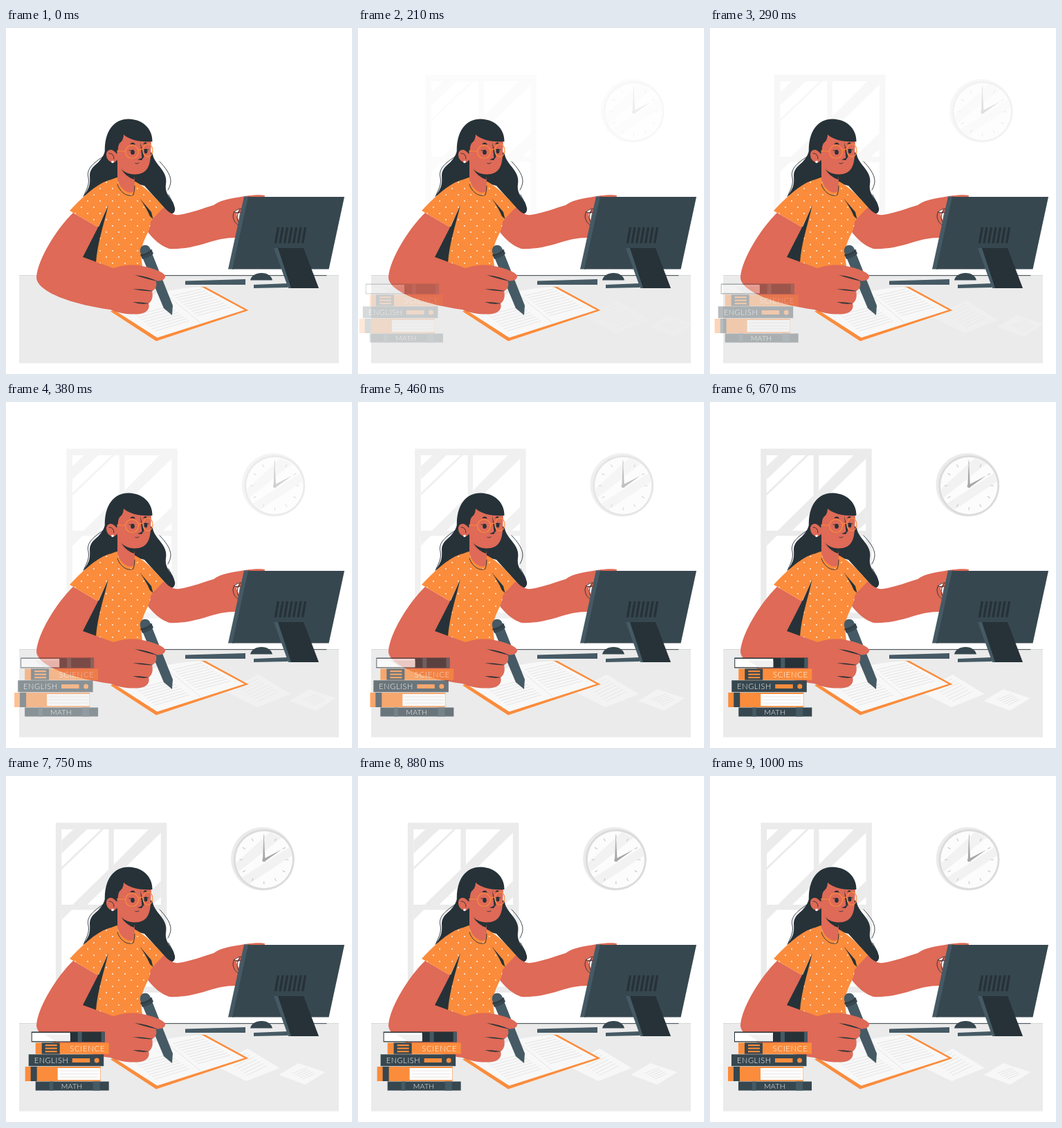
An HTML page for the animation above (1040 ms loop, 500 by 500 pixels).

```html
<!DOCTYPE html>
<html lang="en">
<head>
<meta charset="utf-8">
<title>Studying at the desk</title>
<style>
  html, body { margin: 0; width: 100%; height: 100%; overflow: hidden; background: #fff; }
  svg { display: block; width: 100vw; height: 100vh; }
  text { font: 300 11.5px Lato, "Open Sans", sans-serif; letter-spacing: .6px; fill: #fff; }
  .skin { fill: #de6a57; }
  .dark { fill: #263238; }
  .slate { fill: #37474f; }
  .steel { fill: #455a64; }
  .orange { fill: #fb8c3c; }
  .pale { fill: #ebebeb; }
  .white { fill: #fff; }
  .ink { fill: none; stroke: #263238; stroke-width: .9; stroke-linecap: round; }
  .rule { fill: none; stroke: #e0e0e0; stroke-width: .8; }
  .wire { fill: none; stroke: #fb8c3c; stroke-width: 1.2; }
</style>
</head>
<body>
<svg viewBox="0 0 500 500">
  <defs>
    <pattern id="dots" width="18" height="18" x="132" y="228" patternUnits="userSpaceOnUse">
      <rect width="18" height="18" class="orange"/>
      <circle cx="4" cy="4" r=".9" class="white"/>
      <circle cx="13" cy="13" r=".9" class="white"/>
    </pattern>
  </defs>

  <g data-from="30">
    <path class="pale" d="M73.5 67.5H234V313H73.5Z"/>
    <path class="white" d="M82 77H150V186H82ZM157.500 77H225.500V186H157.500ZM82 193.500H150V304.500H82ZM157.500 193.500H225.500V304.500H157.500Z"/>
    <path class="pale" d="M82 93L99 77H119L82 112ZM82 131.500L139 77H143L82 135.500ZM98 186L150 135V156L119 186ZM157.500 128L208 77H225.500V82L157.500 148ZM82 193H97L82 208ZM190 186L225.500 152V175L213 186Z"/>
  </g>

  <g data-from="30">
    <circle cx="372.500" cy="119.700" r="45.700" class="pale"/>
    <circle cx="374.500" cy="121" r="44" fill="#dbdbdb"/>
    <circle cx="374.500" cy="121" r="41.200" fill="#fcfcfc"/>
    <path fill="#f2f2f2" d="M334 126L383 81L400 89L337 139ZM342 147L411 103L415 115L353 156Z"/>
    <g id="ticks" stroke="#c4c4c4"></g>
    <path fill="#a8a8a8" d="M372.700 122L374.200 82L376.200 122ZM373.500 120L399.500 106.500L375.500 123.500Z"/>
    <circle cx="374.500" cy="121.500" r="2.500" fill="#a8a8a8"/>
  </g>

  <path class="pale" d="M19 357.500H481V484.500H19Z"/>
  <path d="M19 357.500H481" stroke="#c4c6c7" stroke-width=".6"/>
  <path class="ink" d="M225 357.700H463"/>

  <g data-from="30">
    <path fill="#f7f7f7" d="M303 418L351 394L397 422L349 441ZM396 432L424 415L463 428L434 446Z"/>
    <g id="notes" class="rule"></g>
  </g>

  <!-- notebook -->
  <path class="orange" d="M151 409.500L160 406L284 374L288 374L350.500 408L217 452.500Z"/>
  <path fill="#f8f8f8" d="M157 408L200 390Q232 376 283.500 374.500L344.500 407.500L218.500 447.500Z"/>
  <g id="lines" class="rule"></g>
  <path class="rule" d="M235 388Q256 405 281 426"/>

  <!-- keyboard and mouse -->
  <path class="steel" d="M259 365.500L346 363V371H259ZM358 371L407 369V375L358 376Z"/>
  <path class="slate" d="M353 364.500C354 358 362 354 369 354C378 354 384 359 385 364.500Z"/>

  <!-- hair behind -->
  <path class="dark" d="M145 165C143 199 122 194 121 213C122 228 120 232 111 244L150 222L163 218L200 228L237 269C242 269 245 265 244 260C241 246 229 242 231 226C235 206 214 198 212 182L200 170Z"/>
  <path class="ink" d="M140 186C125 196 116 204 119 216C121 227 116 234 113 241M222 193C240 212 241 222 234 234M235 241C239 250 245 255 242 266"/>

  <!-- far arm -->
  <path class="skin" d="M228 259C235 267 243 271 250 270C270 267 285 260 300 256C312 247 330 246 345 243C358 241 370 241 374 242L370 270L334 303C315 303 306 306 292 310C270 317 252 320 236 319C222 314 214 306 205 295L207 272Z"/>
  <path class="white" d="M330 266Q332 262 337 262L334 267ZM333 269L338 267L336 278Z"/>
  <path class="ink" d="M341 261Q328 262 328 272Q329 282 337 285.500M338 263Q330 273 338 284M329 266Q335 268 341 266"/>

  <!-- body -->
  <path fill="url(#dots)" d="M152 219L160 216L187 222C202 230 216 245 228 259L212 276L209 280C209 294 199 302 196 320C194 332 197 338 197 346L155 348L129 338C132 310 139 286 148 257L133 288L92 264C113 242 132 224 152 219Z"/>
  <path class="dark" d="M148 256L134 287L125 290L105 331L130 339C132 312 140 288 148 256ZM193 246L210 266L212.500 276L208 272Q203 260 193 246Z"/>
  <path class="skin" d="M161 185V218C164 232 177 242 185 236L186 222L184 206Z"/>
  <path class="dark" d="M166 203Q174 211 185 211V219Q173 215 166 203Z"/>
  <path class="ink" d="M161 226C165 238 176 245 184 241Q186 236 186 228"/>

  <!-- head -->
  <path class="skin" d="M159 165L172 148L210 160L209 184C208 202 202 211 187 211.500C173 211.500 163 205 160 189Z"/>
  <path class="dark" d="M143 182C141 148 157 131.500 177 131.500C200 132 212 148 211.500 164C196 165 180 163 170 154C169 168 163 162 162 174L160 182C152 172 146 176 145 186Z"/>
  <path class="skin" d="M160 182C153 172 145 176 145 183C145 190 150 195 157 194L161 190Z"/>
  <path class="ink" d="M149 181Q156 181 156 189"/>
  <circle cx="154" cy="193.500" r="1.800" class="white"/>
  <path class="dark" d="M179 168Q184 163 187 168.500L183 168ZM198 168Q202 162 204 168L201 167.500Z"/>
  <ellipse class="dark" cx="183" cy="179.500" rx="2.800" ry="3.600"/>
  <ellipse class="dark" cx="202" cy="178" rx="2.400" ry="3.400"/>
  <path class="ink" d="M178 177L183 177M199 175.500L206 176M187 195.500Q190 197 192 195"/>
  <path class="dark" d="M194 165Q197 177 199.500 186L196 191L190 190.500L196.500 187.500Z"/>
  <g class="wire">
    <circle cx="182" cy="179" r="9.500"/>
    <ellipse cx="205" cy="177" rx="7" ry="9.300"/>
    <path d="M160 178L172.500 178M191.500 177Q195 174 198 176"/>
  </g>

  <!-- monitor -->
  <path class="steel" d="M344 243.500H352L329 348.500H321Z"/>
  <path class="slate" d="M350 244H489L466.500 348.500H327Z"/>
  <path id="vents" class="ink" style="stroke-width:3.500;stroke-linecap:butt"/>
  <path class="steel" d="M387 318H395L416 376H408Z"/>
  <path class="dark" d="M393 318H430L452 376H412Z"/>

  <!-- pen and writing arm -->
  <path class="steel" d="M194 324C192 312 205 311 208 318L241 401L240 415L228 405Z"/>
  <path class="slate" d="M194 327Q204 326 210 319.500L213 326Q207 332 197 334Z"/>
  <path class="ink" d="M195 329Q206 327 211 321"/>
  <path class="skin" d="M97 267C73 290 46 334 44 360C44 381 94 399 151 407C166 414 188 415 198 412C205 410 208 404 206 398C211 395 213 388 211 380C217 378 219 370 216 365C224 367 231 363 230 358C228 352 205 344 186 342.500C170 342 163 345 155 347L111 331L133 288Z"/>
  <path class="dark" d="M186 357Q205 359 219 366Q204 363 186 357ZM183 377Q198 377 213 380Q198 381 183 377ZM183 396Q195 396 207 398Q194 400 183 396Z"/>

  <!-- books -->
  <g data-from="-30">
    <path class="dark" d="M35 369.500H141V384.500H35Z"/>
    <path class="white" d="M36 371H91V383.300H36Z"/>
    <path fill="#f0f0f0" d="M55 374H91V383.300H70Z"/>
    <path class="steel" d="M102 370H108V384H102ZM136 370H141V384H136Z"/>

    <path class="orange" d="M41 385.500H147V401.700H41Z"/>
    <path class="slate" d="M50 385.500H76V401.700H50Z"/>
    <path class="orange" d="M55 388H72V390.300H55ZM55 392.500H72V394.800H55ZM55 397H72V399.300H55Z"/>
    <text x="90.500" y="398">SCIENCE</text>

    <path class="slate" d="M31 402.300H139.500V419.300H31Z"/>
    <path class="orange" d="M94 408H119.500V414H94Z"/>
    <circle cx="129.500" cy="411" r="3.500" class="orange"/>
    <text x="39" y="415" style="font-size:11px">ENGLISH</text>

    <path class="orange" d="M26 420H135V441H26Z"/>
    <path class="slate" d="M34 420H43V441H34Z"/>
    <path class="white" d="M73 422H134.500V439.300H73Z"/>
    <path class="rule" d="M76 426H132M76 430.500H132M76 435H132"/>

    <path class="slate" d="M41 441.500H147V454.500H41Z"/>
    <path class="steel" d="M61 441.500H66.500V454.500H61ZM124 441.500H134V454.500H124Z"/>
    <text x="78" y="451.700" style="font-size:10.500px;letter-spacing:.3px">MATH</text>
  </g>
</svg>
<script>
const byId = id => document.getElementById(id);
const path = d => `<path d="${d}"/>`;

// Parallel strokes: the ends of the first one, then the step of each end.
function ruled(count, [x1, y1, x2, y2], [dx1, dy1, dx2, dy2]) {
  let d = '';
  for (let i = 0; i < count; i++)
    d += `M${x1 + i * dx1} ${y1 + i * dy1}L${x2 + i * dx2} ${y2 + i * dy2}`;
  return d;
}

byId('vents').setAttribute('d', ruled(7, [393.5, 288, 389.5, 311], [6.5, 0, 6.5, 0]));
byId('lines').innerHTML =
  path(ruled(10, [241, 387, 283, 377], [3.9, 3.2, 4.6, 2.9])) +
  path(ruled(8, [187, 415, 237, 402], [4, 3.3, 4, 3]));
byId('notes').innerHTML =
  path(ruled(7, [323, 413, 350, 400], [4.5, 3.3, 4.8, 3.1])) +
  path(ruled(5, [415, 430, 436, 422], [4, 2, 3, 2]));

byId('ticks').innerHTML = Array.from({ length: 12 }, (_, i) =>
  `<path d="M374.5 85.5V90" transform="rotate(${i * 30} 374.5 121)"/>`).join('');

// Bezier easing (.36, -.01, .5, 1.38), which overshoots before it settles.
const curve = (a, b, s) => 3 * (1 - s) ** 2 * s * a + 3 * (1 - s) * s * s * b + s ** 3;
function ease(x) {
  if (x >= 1) return 1;
  let lo = 0, hi = 1;
  for (let i = 0; i < 24; i++) {
    const mid = (lo + hi) / 2;
    if (curve(.36, .5, mid) < x) lo = mid; else hi = mid;
  }
  return curve(-.01, 1.38, lo);
}

const LOOP = 1040, STEPS = 25;
const sliders = document.querySelectorAll('[data-from]');
const start = performance.now();

function draw() {
  const time = (performance.now() - start) % LOOP;
  const step = Math.floor((time + 4) / LOOP * STEPS) % STEPS;
  const p = step < 3 ? 0 : ease(step / 24 + .025);
  for (const el of sliders) {
    el.setAttribute('transform', `translate(${el.dataset.from * (1 - p)})`);
    el.setAttribute('opacity', Math.min(1, Math.max(0, p)));
  }
  requestAnimationFrame(draw);
}
draw();
</script>
</body>
</html>
```
